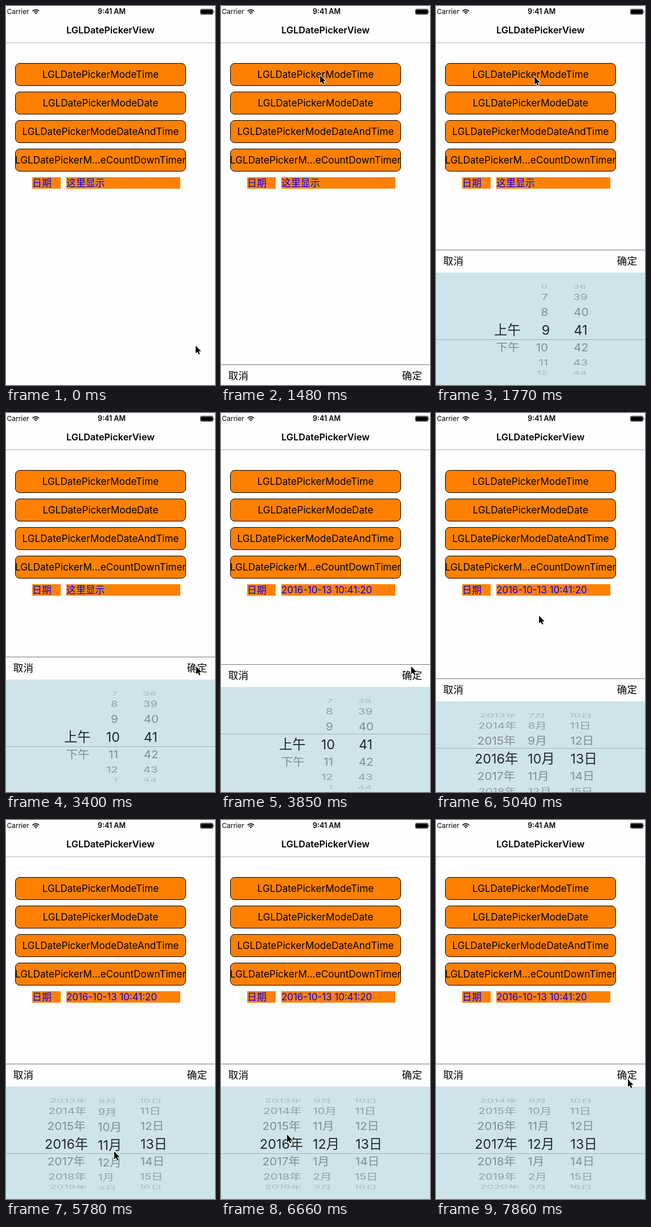
Write an HTML page that moves like this. It is 367 px wide and 664 px high and loops after 8000 ms.

```html
<!DOCTYPE html>
<html lang="zh">
<head>
<meta charset="utf-8">
<title>Date picker</title>
<style>
  html, body { margin: 0; width: 100%; height: 100%; overflow: hidden; background: #fefefe; }
  svg { display: block; width: 367px; height: 664px; overflow: hidden;
        font-family: Inter, "Noto Sans CJK SC", "Noto Sans CJK", sans-serif; }
  text { white-space: pre; }
  .mid { text-anchor: middle; }
  .btn rect { fill: #ff8000; stroke: #000; }
  .btn text { font-size: 17.1px; }
  .tag { fill: #ff8000; }
  .note { fill: #00f; font-size: 16.9px; }
  .bar { font-size: 17.6px; }
  .row { fill: #101618; font-size: 20.8px; }
  .big { fill: #22292c; font-size: 23.3px; }
</style>
</head>
<body>
<svg viewBox="0 0 367 664">
  <defs>
    <clipPath id="band"><path d="M0 549.5H367V584H0Z"/></clipPath>
    <clipPath id="rest"><path d="M0 467H367V549.5H0ZM0 584.5H367V670H0Z"/></clipPath>
  </defs>
  <rect width="367" height="664" fill="#fefefe"/>

  <text x="1.5" y="14.4" font-size="12">Carrier</text>
  <g fill="none" stroke="#000" stroke-width="1.7">
    <path d="M46.6 8.9a8.2 8.2 0 0 1 11.4 0M48.8 11.2a5 5 0 0 1 7 0"/>
    <path d="M52.3 14.6l-1.8-1.9a2.6 2.6 0 0 1 3.6 0z" fill="#000" stroke="none"/>
  </g>
  <text class="mid" x="185.5" y="14.4" font-size="12.5" font-weight="600">9:41 AM</text>
  <rect x="341.5" y="5.5" width="22" height="9" rx="1.8" fill="none" stroke="#333"/>
  <rect x="342.2" y="6.4" width="20.6" height="7.4" rx="1"/>
  <path d="M364.6 8.4a1.9 1.9 0 0 1 0 3.4z"/>
  <text class="mid" x="183.5" y="48.1" font-size="16.3" font-weight="600">LGLDatePickerView</text>
  <path d="M0 64.5H367" stroke="#b0b0b0"/>

  <g id="buttons"></g>
  <rect class="tag" x="46" y="300" width="50" height="20"/>
  <rect class="tag" x="106" y="300" width="200" height="20"/>
  <text class="note" x="46" y="316.3">日期</text>
  <text class="note" id="result" x="106" y="316.3"></text>
  <path id="scrap" d="M0 658.5H152" stroke="#808080"/>

  <g id="panel">
    <rect y="427" width="367" height="240" fill="#fefefe"/>
    <path d="M0 427.5H367" stroke="#787878"/>
    <text class="bar" x="12.8" y="453.2">取消</text>
    <text class="bar" x="317.8" y="453.2">确定</text>
    <rect y="467" width="367" height="200" fill="#cfe3ea"/>
    <g id="outer" clip-path="url(#rest)"></g>
    <g id="inner" clip-path="url(#band)"></g>
    <path id="rule" stroke="#a3b3b9"/>
  </g>

  <path id="cursor" d="M0 0V13.6L3.1 10.8L5.3 15.6L7.4 14.7L5.3 9.9H9.5Z"
        stroke="#fff" stroke-width="1.8" paint-order="stroke" stroke-linejoin="round"/>
</svg>
<script>
const $ = id => document.getElementById(id);
const LOOP = 8000, STEP = LOOP / 54;
const SLIDE = 390, MOVE = 400, PULL = 320, HOLD = 200, SETTLE = 280;
const MID = 567.3, RADIUS = 82.8, ANGLE = 22 * Math.PI / 180, LENS = 35;

function add(parent, tag, attrs, text) {
  const el = document.createElementNS('http://www.w3.org/2000/svg', tag);
  for (const k in attrs) el.setAttribute(k, attrs[k]);
  if (text) el.textContent = text;
  return parent.appendChild(el);
}
const show = (el, on) => { el.style.display = on ? '' : 'none'; };

['Time', 'Date', 'DateAndTime', ''].forEach((mode, i) => {
  const g = add($('buttons'), 'g', { class: 'btn' }), y = 100 + i * 50;
  add(g, 'rect', { x: 16.5, y: y + .5, width: 299, height: 39, rx: 7.5 });
  add(g, 'text', { class: 'mid', x: 166, y: y + 26.4 },
    mode ? 'LGLDatePickerMode' + mode : 'LGLDatePickerM...eCountDownTimer');
});

// 0 before start, 1 after start + length, smooth between
function ease(t, start, length) {
  const p = Math.min(1, Math.max(0, (t - start) / length));
  return p * p * (3 - 2 * p);
}

// A wheel is pulled most of the way, held, then snaps to its row
const hour = { start: 2380, from: 9, count: 1 };
const month = { start: 5420, from: 10, count: 2 };
const year = { start: 6680, from: 2016, count: 1 };
const pullEnd = s => s.start + PULL * s.count;
const pull = (s, t) => s.count * ease(t, s.start, PULL * s.count);
const spin = s => t =>
  s.from + .8 * pull(s, t) + .2 * s.count * ease(t, pullEnd(s) + HOLD, SETTLE);
const grab = (s, t) => 25 * (pull(s, t) - s.count * ease(t, pullEnd(s) + HOLD, MOVE));

// Cursor stops: arrival time, x, y
const stops = [
  [0, 333, 595], [400, 326, 627], [880, 178, 113], [1600, 173, 124], [2360, 200, 600],
  [3390, 334, 444], [4290, 156, 178], [5037, 181, 355], [5420, 190, 610],
  [6600, 116, 551], [7680, 351, 474], [7845, 337, 454]
];

function cursorAt(t) {
  let [, x, y] = stops[0];
  for (let i = 1; i < stops.length; i++) {
    const [end, nx, ny] = stops[i], length = Math.min(MOVE, end - stops[i - 1][0]);
    const e = ease(t, end - length, length);
    x += (nx - x) * e;
    y += (ny - y) * e;
  }
  return [x, y - grab(hour, t) - grab(month, t) - grab(year, t)];
}

const wrap = (n, m) => ((n - 1) % m + m) % m + 1;
const fixed = v => () => v;
const timeCols = [
  { x: 105, bigX: 102, at: fixed(0), label: n => ['上午', '下午'][n] || '' },
  { x: 197, bigX: 200, end: true, at: spin(hour), label: n => wrap(n, 12) },
  { x: 242, bigX: 242, at: fixed(41), label: n => n }
];
const dateCols = [
  { x: 72, bigX: 68, at: spin(year), label: n => n + '年' },
  { x: 161, bigX: 161, at: spin(month), label: n => wrap(n, 12) + '月' },
  { x: 236, bigX: 236, at: fixed(13), label: n => n + '日' }
];

const pool = (parent, cls, size, count) => [0, 1, 2].map(() =>
  Array.from({ length: count }, () => add(parent, 'text', { class: cls, y: size * .365 })));
const rows = pool($('outer'), 'row', 20.8, 9);
const bigs = pool($('inner'), 'big', 23.3, 3);

function place(el, col, n, x, y, sx, sy, alpha) {
  el.textContent = col.label(n);
  el.setAttribute('text-anchor', col.end ? 'end' : 'start');
  el.setAttribute('transform', `translate(${x} ${y}) scale(${sx} ${sy})`);
  el.setAttribute('opacity', alpha);
}

function drawWheel(col, i, t) {
  const pos = col.at(t), near = Math.round(pos);
  rows[i].forEach((el, j) => {
    const n = near + j - 4, a = (n - pos) * ANGLE, c = Math.max(0, Math.cos(a));
    const s = 1 - .073 * (1 - c);
    place(el, col, n, 183.5 + (col.x - 183.5) * s, MID + RADIUS * Math.sin(a), s, c,
      .03 + .41 * c);
  });
  bigs[i].forEach((el, j) => {
    const n = near + j - 1;
    place(el, col, n, col.bigX, MID + (n - pos) * LENS, 1, 1, 1);
  });
}

function draw(t) {
  const up = ease(t, 1385, SLIDE) - ease(t, 3797, SLIDE) + ease(t, 4746, SLIDE);
  const drop = Math.round(237 * (1 - up));
  $('panel').setAttribute('transform', `translate(0 ${drop})`);
  show($('panel'), drop < 237);
  $('rule').setAttribute('d', drop ? 'M0 549.5H367' : 'M0 584.5H367');
  show($('scrap'), t > 4250 && t < 4800);

  $('result').textContent = t > 3650 ? '2016-10-13 10:41:20' : '这里显示';
  (t < 4500 ? timeCols : dateCols).forEach((col, i) => drawWheel(col, i, t));
  $('cursor').setAttribute('transform', `translate(${cursorAt(t)})`);
}

// Like a screen recording, the picture holds still within each step
let last = -1;
const start = performance.now();
function tick() {
  const step = Math.floor(((performance.now() - start) % LOOP + 8) / STEP) % 54;
  if (step !== last) draw((last = step) * STEP);
  requestAnimationFrame(tick);
}
tick();
</script>
</body>
</html>
```
